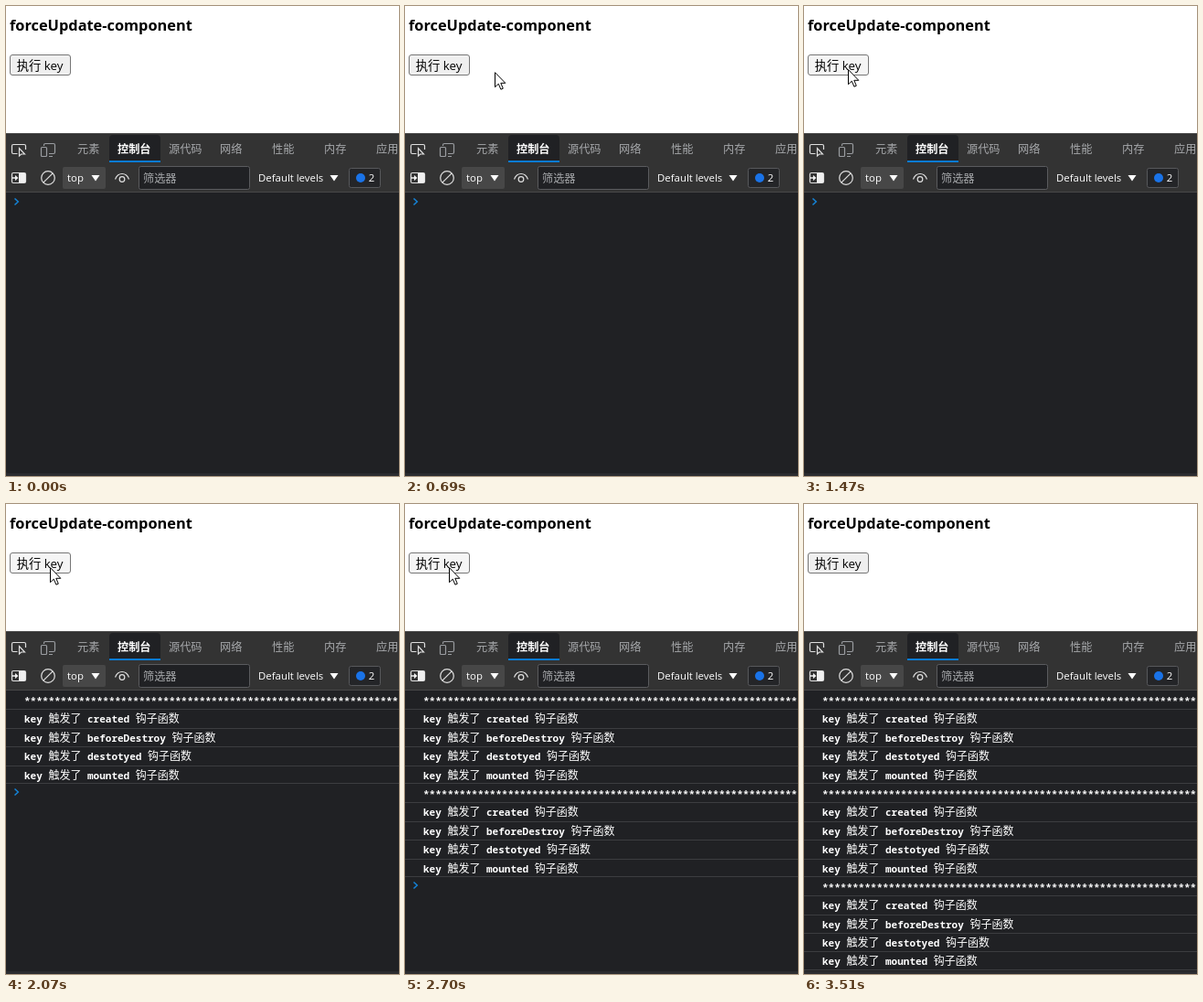
These frames come from a looping animation (430x514 px, 4740 ms). An HTML page:

```html
<!DOCTYPE html>
<html lang="zh-CN">
<head>
<meta charset="utf-8">
<title>forceUpdate-component</title>
<style>
  html, body { margin: 0; width: 100%; height: 100%; overflow: hidden; background: #fff; }
  svg { display: block; width: 430px; height: 514px; }
  text { font-family: "Open Sans", "Noto Sans CJK SC", "Noto Sans CJK", sans-serif; white-space: pre; }
  .tab { font-size: 12.2px; fill: #a6a8ab; }
  .tool { font-size: 11.4px; font-weight: 500; fill: #fff; }
  .log { font: 600 11px "Noto Sans Mono", "Noto Sans CJK SC", "Noto Sans CJK", monospace; fill: #fff; }
  .log .cjk { font-size: 12px; font-weight: 400; }
  .icon { fill: none; stroke: #e0e0e0; stroke-width: 1.2; }
</style>
</head>
<body>
<svg viewBox="0 0 430 514">
  <rect width="430" height="514" fill="#fff"/>
  <text x="4" y="27" font-size="16.35" font-weight="700">forceUpdate-component</text>
  <rect id="button" x="4.5" y="53.5" width="66" height="22" rx="2.5"/>
  <text x="11.7" y="70" font-size="13.33">执行 key</text>

  <rect y="139" width="430" height="65" fill="#333"/>
  <rect y="204" width="430" height="310" fill="#202124"/>
  <path d="M0 139.5H430M0 203.5H430" stroke="#484848"/>
  <path d="M113 171V145q0-4 4-4h48q4 0 4 4V171z" fill="#202124"/>
  <rect x="113" y="169" width="56" height="2" fill="#0b7bd3"/>
  <g id="tabs"></g>

  <!-- inspect and device icons -->
  <path class="icon" d="M12.5 161.5H8q-1.5 0-1.5-1.5V153q0-1.5 1.5-1.5H20q1.5 0 1.5 1.5V157"/>
  <path class="icon" d="M14.5 155.500V164l2.200-2H20.500z"/>
  <g class="icon" style="stroke:#9a9da1">
    <path d="M41.5 153V152q0-1.5 1.5-1.5H52q1.5 0 1.5 1.5V160q0 1.500-1.500 1.500H47M47 164.500h4"/>
    <rect x="38.500" y="154.500" width="6" height="10" rx="1"/>
  </g>

  <!-- console toolbar -->
  <rect x="6.500" y="182.500" width="15" height="11" rx="1.500" class="icon"/>
  <path d="M14 183h7v10h-7zM7 187.300h3V185l3.500 3-3.500 3v-2.300h-3z" fill="#f0f0f0"/>
  <circle cx="46" cy="188" r="7.300" class="icon"/>
  <path d="M51.200 182.800L40.800 193.200" class="icon"/>
  <rect x="62" y="176" width="47" height="24" rx="2" fill="#474747"/>
  <text class="tool" x="67" y="192">top</text>
  <path d="M93.500 185h9l-4.500 6.500zM354.500 185h9l-4.500 6.500z" fill="#fff"/>
  <path class="icon" d="M119.500 189.500C122.500 181.500 131.500 181.500 134.500 189.500"/>
  <circle cx="127" cy="189.500" r="2.800" class="icon"/>
  <rect x="145.500" y="175.500" width="121" height="25" rx="2" fill="#202124" stroke="#5a5b5e"/>
  <text class="tab" x="150" y="192.500">筛选器</text>
  <text class="tool" x="276" y="192">Default levels</text>
  <rect x="375.500" y="177.500" width="34" height="21" rx="2" fill="#242528" stroke="#57585b"/>
  <circle cx="388" cy="188" r="5" fill="#1a73e8"/>
  <text class="tool" x="396.700" y="192">2</text>

  <g id="logs"></g>
  <path id="prompt" d="M9.500 210.500l3.800 3.500-3.800 3.500" fill="none" stroke="#1583d8" stroke-width="1.500"/>
  <path d="M0 510V514H430V511H4Q1 511 0 510z" fill="#2b2c30"/>
  <path id="cursor" d="M.5 .7V16.700L4.300 13.200 6.900 19.200 9.300 18.200 6.800 12.300H11.800z"
        fill="#fff" stroke="#000" stroke-linejoin="round"/>
</svg>
<script>
const LOOP = 4740, STEP = 30, TOP = 204, ROW = 20.4, GROUP = 101.92;
const REST = [48, 69];
const $ = id => document.getElementById(id);

const tabs = ['元素', '控制台', '源代码', '网络', '性能', '内存', '应用'];
const tabX = [78, 122, 178, 234, 291, 348, 405];
$('tabs').innerHTML = tabs.map((name, i) => {
  const active = i === 1 ? ' style="fill:#fff;font-weight:700"' : '';
  return `<text class="tab" x="${tabX[i]}" y="161"${active}>${name}</text>`;
}).join('');

const cjk = s => `<tspan class="cjk">${s}</tspan>`;
const hooks = ['created', 'beforeDestroy', 'destotyed', 'mounted'];
const messages = ['*'.repeat(64), ...hooks.map(h => `key ${cjk('触发了')} ${h} ${cjk('钩子函数')}`)];

function logGroup(n) {
  const rows = messages.map((message, i) => {
    const top = TOP + n * GROUP + i * ROW;
    const isLast = i === messages.length - 1;
    const line = Math.round(top + ROW) - (isLast ? .5 : -.5);
    return `<text class="log" x="20" y="${Math.round(top + 15)}">${message}</text>` +
      `<path d="M0 ${line}H430" stroke="#3c3d40"/>`;
  });
  return `<g>${rows.join('')}</g>`;
}
$('logs').innerHTML = [0, 1, 2].map(logGroup).join('');
const groups = [...$('logs').children];

// Pointer samples, one per step
const enter = [[425, 34], [396, 39], [345, 47], [304, 56], [268, 62], [246, 67], [229, 71], [221, 72],
  [204, 75], [187, 75], [168, 76], [147, 75], [122, 75], [115, 74], [112, 73], [108, 73], [104, 72], [98, 72],
  [95, 72], [91, 72], [86, 72], [81, 72], [75, 71], [65, 70], [54, 69], REST];
const leave = [REST, [50, 69], [57, 69], [72, 69], [98, 69], [132, 69], [172, 69], [216, 69],
  [264, 69], [340, 68], [366, 62], [411, 60]];
const ENTER_AT = 180, LEAVE_AT = 3150;

const logTimes = [1590, 2190, 2820];
const presses = [[1470, 1590], [2070, 2190], [2700, 2850]];
const looks = { idle: ['#efefef', '#767676'], hover: ['#e5e5e5', '#4f4f4f'], active: ['#f5f5f5', '#767676'] };

// The pause between arriving and the second move is part of the entry path
function pointerAt(t) {
  if (t < ENTER_AT) return null;
  if (t >= LEAVE_AT) return leave[Math.floor((t - LEAVE_AT) / STEP)] || null;
  return enter[Math.floor((t - ENTER_AT) / STEP)] || REST;
}

function render(t) {
  const p = pointerAt(t);
  $('cursor').style.display = p ? '' : 'none';
  if (p) $('cursor').setAttribute('transform', `translate(${p})`);

  const pressed = presses.some(([from, to]) => t >= from && t < to);
  const [fill, stroke] = looks[pressed ? 'active' : p && p[0] < 71 ? 'hover' : 'idle'];
  $('button').setAttribute('fill', fill);
  $('button').setAttribute('stroke', stroke);

  const count = logTimes.filter(at => t >= at).length;
  groups.forEach((g, i) => g.style.display = i < count ? '' : 'none');
  $('prompt').style.display = count < 3 ? '' : 'none';
  $('prompt').setAttribute('transform', `translate(0 ${Math.floor(count * GROUP)})`);
}

const start = performance.now();
function frame() {
  render((performance.now() - start) % LOOP);
  requestAnimationFrame(frame);
}
frame();
</script>
</body>
</html>
```
